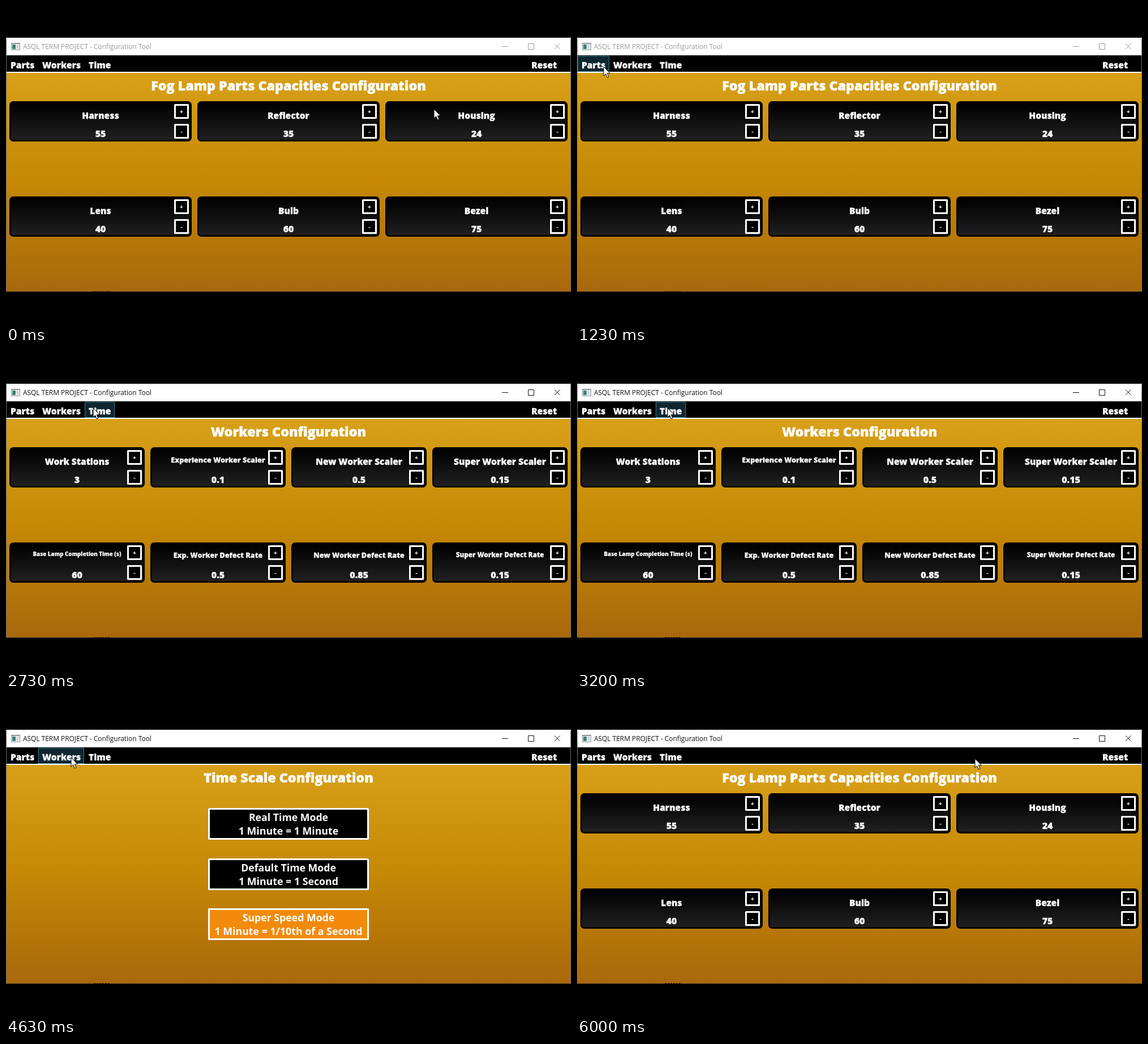
An HTML page with a canvas that plays this animation: 998x561 px, repeating every 6.03 s.

```html
<!DOCTYPE html>
<html lang="en">
<head>
<meta charset="utf-8">
<title>Configuration Tool</title>
<style>
html, body { margin: 0; width: 100%; height: 100%; overflow: hidden; background: #000; }
canvas { display: block; }
</style>
</head>
<body>
<canvas width="998" height="561"></canvas>
<script>
const ctx = document.querySelector('canvas').getContext('2d');
const LOOP = 6030, ACTIVE_AT = 1330;
const FONT = '"Open Sans", "Noto Sans", sans-serif';
const MAIN_TITLE = 'Fog Lamp Parts Capacities Configuration';

// Cursor stops: time, x, y
const stops = [
  [0, 756, 182], [100, 756, 182], [1150, 47, 107], [1500, 47, 107], [1800, 100, 107],
  [2200, 100, 107], [2650, 154, 99], [3100, 154, 99], [3200, 160, 99], [4400, 160, 99],
  [4600, 115, 105], [4750, 115, 105], [5000, 43, 110], [5850, 43, 110], [6000, 703, 107], [LOOP, 703, 107]
];

// Page changes: time, page
const visits = [[0, 'parts'], [1950, 'workers'], [3770, 'time'], [4730, 'workers'], [5350, 'parts']];

// Menu buttons: label, text x, left, right
const menu = [['Parts', 8, 1, 57], ['Workers', 64, 57, 138], ['Time', 146, 139, 192]];

// Cards: label, value, label size
const parts = [
  ['Harness', '55'], ['Reflector', '35'], ['Housing', '24'],
  ['Lens', '40'], ['Bulb', '60'], ['Bezel', '75']
];
const workers = [
  ['Work Stations', '3'], ['Experience Worker Scaler', '0.1', 13],
  ['New Worker Scaler', '0.5'], ['Super Worker Scaler', '0.15'],
  ['Base Lamp Completion Time (s)', '60', 10], ['Exp. Worker Defect Rate', '0.5', 13],
  ['New Worker Defect Rate', '0.85', 13], ['Super Worker Defect Rate', '0.15', 12]
];
const modes = [
  ['Real Time Mode', '1 Minute = 1 Minute'],
  ['Default Time Mode', '1 Minute = 1 Second'],
  ['Super Speed Mode', '1 Minute = 1/10th of a Second']
];

function rect(x, y, w, h, color) {
  ctx.fillStyle = color;
  ctx.fillRect(x, y, w, h);
}

function frame(x, y, w, h, line, color) {
  ctx.strokeStyle = color;
  ctx.lineWidth = line;
  ctx.strokeRect(x + line / 2, y + line / 2, w - line, h - line);
}

function gradient(y0, y1, ...colors) {
  const g = ctx.createLinearGradient(0, y0, 0, y1);
  colors.forEach((c, i) => g.addColorStop(i / (colors.length - 1), c));
  return g;
}

function text(str, x, y, size, { weight = 700, align = 'center', color = '#fff' } = {}) {
  ctx.font = `${weight} ${size}px ${FONT}`;
  ctx.textAlign = align;
  ctx.fillStyle = color;
  ctx.fillText(str, x, y);
}

// The heaviest weight runs wide; scale its em so the 24 px title spans 486 px
ctx.font = `800 24px ${FONT}`;
const HEAVY_EM = 486 / ctx.measureText(MAIN_TITLE).width;

function heavy(str, x, y, size, align) {
  text(str, x, y, size * HEAVY_EM, { weight: 800, align });
  ctx.strokeStyle = '#fff';
  ctx.lineWidth = size / 45;
  ctx.lineJoin = 'round';
  ctx.strokeText(str, x, y);
}

function cursorAt(t) {
  const i = stops.findIndex(s => s[0] > t);
  const [t0, x0, y0] = stops[i - 1], [t1, x1, y1] = stops[i];
  const p = (t - t0) / (t1 - t0), e = p * p * (3 - 2 * p);
  return [x0 + (x1 - x0) * e, y0 + (y1 - y0) * e];
}

function titleBar(active) {
  const ink = active ? '#111' : '#999';
  rect(0, 56, 998, 31, '#fff');
  rect(9, 65, 16, 13, '#8a9299');
  rect(10, 67, 14, 10, '#f4f6f7');
  rect(11, 68, 6, 8, '#3d8277');
  rect(18, 68, 5, 8, '#d5dade');
  text('ASQL TERM PROJECT - Configuration Tool', 30, 76, 11.92, { weight: 400, align: 'left', color: ink });
  rect(876, 71, 11, 1, ink);
  frame(922, 66, 11, 11, 1, ink);
  ctx.beginPath();
  ctx.moveTo(969, 66.5); ctx.lineTo(978.5, 76);
  ctx.moveTo(978.5, 66.5); ctx.lineTo(969, 76);
  ctx.stroke();
}

function menuBar(hover) {
  rect(0, 87, 998, 29, '#000');
  for (const item of menu) {
    const [label, x, left, right] = item;
    if (item === hover) {
      rect(left, 88, right - left, 28, '#10262f');
      frame(left, 88, right - left, 28, 1, '#387a8a');
    }
    heavy(label, x, 110, 16, 'left');
  }
  heavy('Reset', 928, 110, 16, 'left');
  rect(0, 116, 998, 2, '#fff');
}

function stepButton(x, y, sign) {
  rect(x, y, 26, 26, '#000');
  frame(x, y, 26, 26, 3, '#fff');
  text(sign, x + 13, y + 17, 11);
}

function cards(list, cols) {
  const step = 996 / cols, w = step - 10;
  list.forEach(([label, value, size = 16], i) => {
    const x = 6 + i % cols * step, y = i < cols ? 168 : 336, mid = x + w / 2;
    ctx.fillStyle = '#000';
    ctx.beginPath();
    ctx.roundRect(x, y, w, 71, 7);
    ctx.fill();
    ctx.fillStyle = gradient(y + 3, y + 68, '#000', '#202022');
    ctx.beginPath();
    ctx.roundRect(x + 3, y + 3, w - 6, 65, 4);
    ctx.fill();
    heavy(label, mid, y + 24 + (size - 10) * 1.15, size);
    heavy(value, mid, y + 63, 16.5);
    stepButton(x + w - 31, y + 5, '+');
    stepButton(x + w - 31, y + 40, '-');
  });
}

function timeModes() {
  modes.forEach(([name, scale], i) => {
    const y = Math.round(194 + i * 88.6);
    rect(357, y, 284, 56, i === 2 ? '#f28a0c' : '#000');
    frame(357, y, 284, 56, 3, '#fff');
    text(name, 499, y + 23, 17.7);
    text(scale, 499, y + 47, 17.8);
  });
}

const pages = {
  parts: [MAIN_TITLE, () => cards(parts, 3)],
  workers: ['Workers Configuration', () => cards(workers, 4)],
  time: ['Time Scale Configuration', timeModes]
};

const arrow = new Path2D('M0 0V16.2L3.7 12.7L6.4 19L9 17.9L6.3 11.7H11.4Z');

function pointer(x, y) {
  ctx.save();
  ctx.translate(x, y);
  ctx.fillStyle = '#fff';
  ctx.strokeStyle = '#000';
  ctx.lineWidth = 1;
  ctx.fill(arrow);
  ctx.stroke(arrow);
  ctx.restore();
}

function draw(t) {
  const [x, y] = cursorAt(t);
  const [since, name] = visits.findLast(v => v[0] <= t);
  const [clickX, clickY] = cursorAt(since);
  // A fresh page shows no hover until the mouse moves
  const moved = x !== clickX || y !== clickY;
  const hover = moved && y > 88 && y < 116 && menu.find(m => x >= m[2] && x < m[3]);
  const [title, body] = pages[name];

  rect(0, 0, 998, 561, '#000');
  rect(0, 116, 998, 388, gradient(118, 503, '#d8a018', '#c68805', '#a9680c'));
  titleBar(t >= ACTIVE_AT);
  menuBar(hover);
  rect(0, 57, 1, 447, '#77736c');
  rect(997, 57, 1, 447, '#77736c');
  rect(0, 503, 998, 1, '#8a6226');
  for (let i = 0; i < 6; i++) rect(155 + i * 5, 503, 3, 1, '#2a1c0a');
  heavy(title, 499, 149, 24);
  body();
  pointer(x, y);
}

function tick() {
  draw(performance.now() % LOOP);
  requestAnimationFrame(tick);
}
tick();
</script>
</body>
</html>
```
